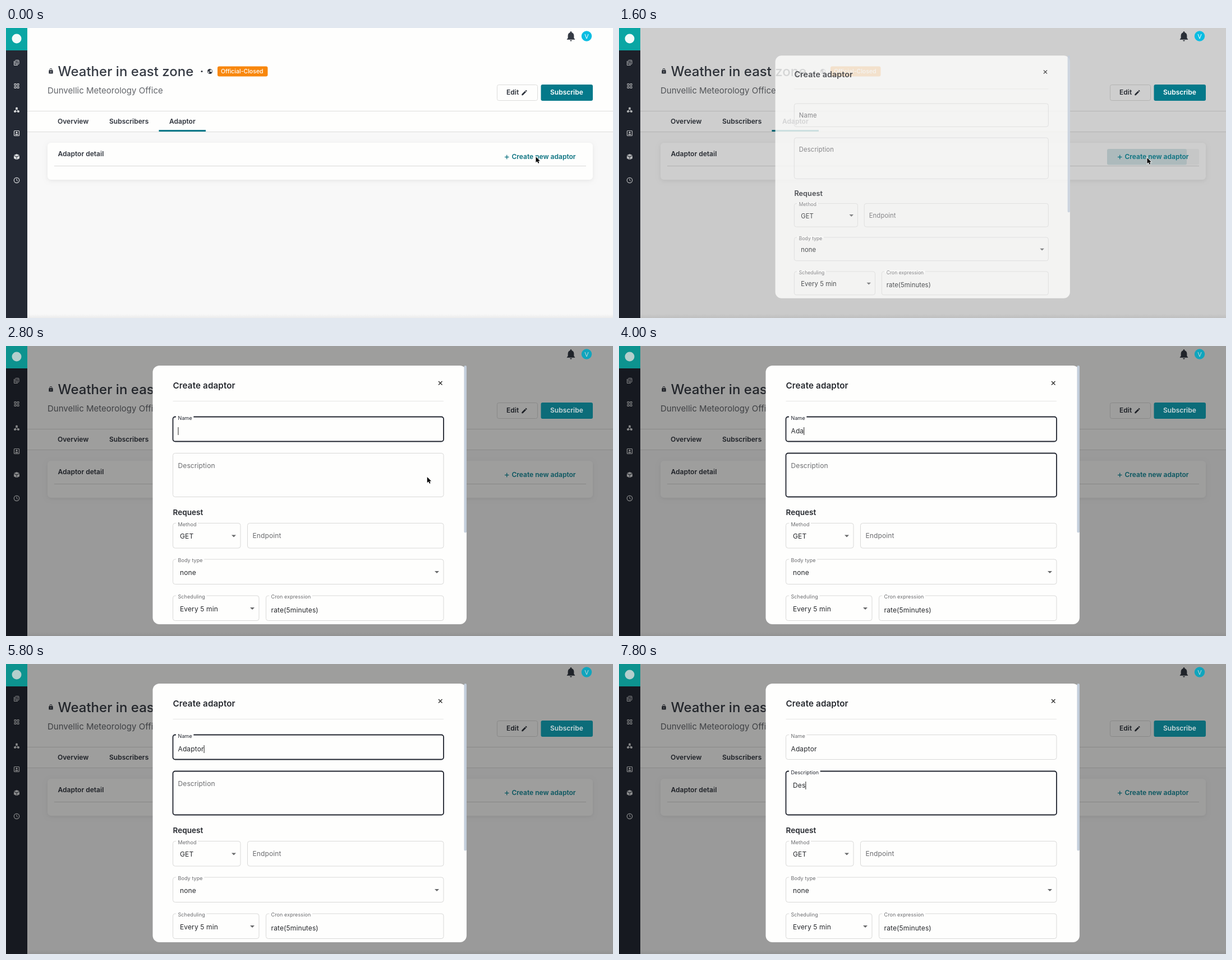
Write an HTML page with a canvas that moves like this. It is 1082 px wide and 518 px high and loops after 8000 ms.

```html
<!DOCTYPE html>
<html lang="en">
<head>
<meta charset="utf-8">
<title>Create adaptor</title>
<style>
  html, body { margin: 0; width: 100%; height: 100%; overflow: hidden; background: #fefefd; }
  canvas { display: block; width: 1082px; height: 518px; }
</style>
</head>
<body>
<canvas id="stage" width="1082" height="518"></canvas>
<script>
const W = 1082, H = 518, LOOP = 8000, STEP = 200;
const ctx = document.getElementById('stage').getContext('2d');
const INK = '#2f343d', TEAL = '#04798a', PAPER = '#fefefd', DARK = '#20242e', GREY = '#6b6c6f', EDGE = '#d9d9d8';

const ICONS = {
  bell: 'M12 22c1.1 0 2-.9 2-2h-4c0 1.1.89 2 2 2zm6-6v-5c0-3.07-1.64-5.64-4.5-6.32V4c0-.83-.67-1.5-1.5-1.5s-1.5.67-1.5 1.5v.68C7.63 5.36 6 7.92 6 11v5l-2 2v1h16v-1z',
  pencil: 'M3 17.25V21h3.75L17.81 9.94l-3.75-3.75zM20.71 7.04a1 1 0 0 0 0-1.41l-2.34-2.34a1 1 0 0 0-1.41 0l-1.83 1.83 3.75 3.75z',
  lock: 'M18 8h-1V6A5 5 0 0 0 7 6v2H6a2 2 0 0 0-2 2v10a2 2 0 0 0 2 2h12a2 2 0 0 0 2-2V10a2 2 0 0 0-2-2zM9 8V6a3 3 0 0 1 6 0v2zM10 15a2 2 0 1 0 4 0a2 2 0 1 0-4 0z',
  globe: 'M2 12a10 10 0 1 0 20 0a10 10 0 1 0-20 0zM4 10l5 5v4.5C6 19 3.500 15 4 10zM10 5h5v3l-4 2v3h5l3 3c2-3 2-8-2-10.500L15 4z',
  cursor: 'M0 0V11.500L2.700 9L4.600 13L6.500 12.100L4.700 8.300H8.200Z'
};
for (const k in ICONS) ICONS[k] = new Path2D(ICONS[k]);

const clamp = v => Math.max(0, Math.min(1, v));
const mix = (a, b, p) => a + (b - a) * clamp(p);

function rect(x, y, w, h, fill, r = 0) {
  ctx.fillStyle = fill;
  ctx.beginPath();
  ctx.roundRect(x, y, w, h, r);
  ctx.fill();
}

function frame(x, y, w, h, color, lw = 1, r = 4) {
  ctx.strokeStyle = color;
  ctx.lineWidth = lw;
  ctx.beginPath();
  ctx.roundRect(x, y, w, h, r);
  ctx.stroke();
}

function disc(x, y, r, fill) {
  ctx.fillStyle = fill;
  ctx.beginPath();
  ctx.arc(x, y, r, 0, 7);
  ctx.fill();
}

function line(color, lw, ...p) {
  ctx.strokeStyle = color;
  ctx.lineWidth = lw;
  ctx.beginPath();
  for (let i = 0; i < p.length; i += 2) ctx.lineTo(p[i], p[i + 1]);
  ctx.stroke();
}

// y is the middle of the capitals
function text(s, x, y, size = 12.02, color = INK, weight = 400, spacing = 0) {
  ctx.font = `${weight} ${size}px Inter, sans-serif`;
  ctx.letterSpacing = spacing * size + 'px';
  ctx.fillStyle = color;
  ctx.fillText(s, x, y + size * 0.36);
  return ctx.measureText(s).width;
}

function icon(name, cx, cy, size, color) {
  ctx.save();
  ctx.translate(cx - size / 2, cy - size / 2);
  ctx.scale(size / 24, size / 24);
  ctx.fillStyle = color;
  ctx.fill(ICONS[name], 'evenodd');
  ctx.restore();
}

function sidebar() {
  const c = '#dcdee0';
  rect(0, 0, 38, H, '#242934');
  // notes
  frame(16.5, 57.500, 6.5, 7, c, 1, 1);
  line(c, 1, 14.500, 59, 14.500, 66.500, 21, 66.500);
  line(c, 1, 18, 60, 22, 60);
  line(c, 1, 18, 62.500, 21, 62.500);
  // grid
  for (const x of [15, 20]) for (const y of [99.500, 104.500]) frame(x, y, 3, 3, c, 1.1, 0.5);
  // cluster
  line(c, 1, 19, 144, 16, 149, 22, 149, 19, 144);
  disc(19, 143.500, 2, c);
  disc(16, 149, 2, c);
  disc(22, 149, 2, c);
  // contact card
  frame(14.500, 183.500, 9, 9, c, 1.2, 1);
  disc(19, 186.700, 1.6, c);
  rect(16.300, 189.300, 5.400, 2, c, 1);
  // box
  ctx.fillStyle = c;
  ctx.fill(new Path2D('M19 225l5 2.300-5 2.300-5-2.300zM14 228.300l4.600 2.200v4.700L14 233zM24 228.300l-4.600 2.200v4.700L24 233z'));
  // clock
  ctx.beginPath();
  ctx.arc(19, 272, 4.700, 0, 7);
  ctx.lineWidth = 1.2;
  ctx.stroke();
  line(c, 1, 19, 269, 19, 272.300, 21, 273.500);
}

function page(hover, ripple) {
  rect(0, 0, W, H, PAPER);
  rect(38, 185, W - 38, H - 185, '#f8f8f8');
  const fade = ctx.createLinearGradient(0, 511, 0, H);
  fade.addColorStop(0, 'rgba(0,0,0,0)');
  fade.addColorStop(1, 'rgba(0,0,0,.05)');
  rect(38, 511, W - 38, 7, fade);
  line('#dededd', 1, 38, 148.500, W, 148.500);
  line('#dcdcdb', 1, 38, 185.500, W, 185.500);
  sidebar();

  icon('bell', 1007, 14.500, 21.500, '#343a44');
  icon('lock', 80, 77, 11, INK);
  text('Weather in east zone', 92.500, 77.500, 24.04, '#363b44', 500);
  disc(349, 77.500, 1.6, INK);
  icon('globe', 363.500, 77.500, 11, INK);
  rect(377, 68.500, 89.500, 18, '#f8870d', 3);
  text('Official-Closed', 383, 77.500, 10.52, '#fff', 500);
  text('Dunvellic Meteorology Office', 74, 112, 15.03, '#63666b');

  frame(875.500, 101.500, 72, 28, '#dcdcdb', 1, 3);
  text('Edit', 892, 115, 12.02, INK, 600);
  icon('pencil', 924, 115.500, 12.5, INK);

  text('Overview', 92, 167, 12.02, INK, 600);
  text('Subscribers', 184, 167, 12.02, INK, 600);
  text('Adaptor', 291, 167, 12.02, INK, 600);
  rect(272.500, 182, 83.500, 3, TEAL);

  ctx.save();
  ctx.shadowColor = 'rgba(0,0,0,.07)';
  ctx.shadowBlur = 7;
  ctx.shadowOffsetY = 2;
  rect(74, 205, 972, 66, PAPER, 6);
  ctx.restore();
  text('Adaptor detail', 92.500, 225, 12.02, INK, 600);
  line('#d9d9d8', 1, 86, 246.500, 1034, 246.500);
  if (hover) rect(870, 216, 164, 28.500, hover, 3);
  if (ripple) rect(870, 216, ripple, 28.500, 'rgba(4,121,138,.13)', 3);
}

// Saturated parts keep most of their colour behind the backdrop
function accents(dim) {
  const on = dim > 0.3;
  const white = on ? '#c9d6d8' : '#fff';
  rect(0, 0, 38, 40, on ? '#0d938f' : '#0aa6a4');
  disc(19, 19, 8.500, on ? '#b5cfcd' : '#f2fbfa');
  disc(1035, 14.500, 9.2, on ? '#10a5bd' : '#0abde2');
  text('V', 1031.300, 14.800, 11, white);
  rect(953.500, 101, 92.500, 29, on ? '#0c6c79' : TEAL, 3);
  text('Subscribe', 970, 115, 12.02, white, 600);
  const teal = on ? '#0a5660' : '#0a7280';
  line(teal, 1.3, 889, 230.500, 896.500, 230.500);
  line(teal, 1.3, 892.750, 226.700, 892.750, 234.300);
  text('Create new adaptor', 901.500, 229.500, 12.02, teal, 600);
}

// Outlined field; float runs 0..1 as the label rises into the border
function field(x, y, w, h, label, { float = 1, strong = false, focus = false, rest = 22 } = {}) {
  frame(x, y, w, h, strong ? DARK : EDGE, strong ? 1.8 : 1, 4);
  const size = mix(12.02, 9.02, float);
  ctx.font = `400 ${size}px Inter, sans-serif`;
  ctx.letterSpacing = size * 0.00938 + 'px';
  const labelW = ctx.measureText(label).width;
  if (float) rect(x + 5.500, y - 1.500, labelW + 6, 3, PAPER);
  text(label, x + 9, y + mix(rest, 2, float), size, focus ? DARK : GREY, 400, 0.00938);
}

function select(x, y, w, label, value) {
  field(x, y, w, 44.500, label);
  text(value, x + 12.500, y + 23.500, 12.02, '#26282c', 400, 0.00938);
  const ax = x + w - 12, ay = y + 21;
  ctx.fillStyle = '#67686a';
  ctx.fill(new Path2D(`M${ax - 4} ${ay}h8l-4 4z`));
}

function entry(s, x, y, caret) {
  const w = text(s, x, y, 12.02, '#26282c', 400, 0.00938);
  if (caret) rect(x + w, y - 7, 1, 14, '#222');
}

function modal(s) {
  ctx.save();
  ctx.globalAlpha = s.alpha;
  ctx.translate(541, 266);
  ctx.scale(s.scale, s.scale);
  ctx.translate(-541, -266);
  rect(261.500, 35, 559.500, 462, PAPER, 12);
  rect(816.500, 35, 4.500, 298.500, '#c3cedb', 2);
  text('Create adaptor', 297.500, 71, 15.2, '#25282e', 600, 0.0075);
  line('#333', 1.4, 771, 63, 777.500, 69.500);
  line('#333', 1.4, 777.500, 63, 771, 69.500);
  line('#e6e6e5', 1, 297.500, 98.500, 780, 98.500);

  field(297.500, 126.500, 482.500, 44, 'Name', { float: s.nameFloat, strong: s.nameFocus, focus: s.nameFocus });
  entry(s.name, 306.500, 152, s.nameFocus && s.caret);
  field(297.500, 191.500, 482.500, 78, 'Description',
    { float: s.descFloat, strong: s.descHover || s.descFocus, focus: s.descFocus });
  entry(s.desc, 310, 217, s.descFocus && s.caret);

  text('Request', 297.500, 297, 13.6, '#25282e', 600);
  select(297.500, 316.500, 120.500, 'Method', 'GET');
  field(430.500, 316.500, 349.500, 44.500, 'Endpoint', { float: 0, rest: 22.500 });
  select(297.500, 381, 482.500, 'Body type', 'none');
  select(297.500, 446, 153.500, 'Scheduling', 'Every 5 min');
  field(463.500, 446, 316.500, 44.500, 'Cron expression');
  text('rate(5minutes)', 472.500, 471.500, 12.02, '#26282c', 400, 0.00938);
  ctx.restore();
}

function pointer(x, y) {
  ctx.save();
  ctx.translate(x, y);
  ctx.scale(0.9, 0.9);
  ctx.lineWidth = 1.6;
  ctx.strokeStyle = '#fff';
  ctx.stroke(ICONS.cursor);
  ctx.fillStyle = '#000';
  ctx.fill(ICONS.cursor);
  ctx.restore();
}

// Letters arrive one per step; the caret blinks from the latest key
const typed = (word, t, start) => word.slice(0, Math.max(0, Math.floor((t - start) / STEP) + 1));

function state(t) {
  const nameFocus = t >= 1800 && t < 6600, descFocus = t >= 6600;
  const key = descFocus
    ? (t >= 7400 ? t : 6600)
    : (t >= 3600 ? Math.min(t, 4800) : 1800);
  return {
    nameFocus, descFocus,
    alpha: t < 1800 ? 0.8 : 1,
    scale: t < 1800 ? 0.9388 : 1,
    nameFloat: t < 1800 ? 0 : t < 2000 ? 0.7 : 1,
    descFloat: t < 6600 ? 0 : t < 6800 ? 0.7 : 1,
    descHover: t >= 3200,
    name: typed('Adaptor', t, 3600),
    desc: typed('Des', t, 7400),
    caret: (t - key) % 1000 < 500
  };
}

function draw(now) {
  const t = Math.floor((now % LOOP) / STEP) * STEP;
  const open = t >= 1600;
  const dim = !open ? 0 : t < 1800 ? 0.19 : 0.38;
  const ripple = !open || t >= 2400 ? 0 : t < 1800 ? 142 : 163;
  const hover = t === 1400 ? '#dcdcdc' : t === 1600 ? '#f4f5f5' : null;

  page(hover, ripple);
  if (open) rect(0, 0, W, H, `rgba(0,0,0,${dim})`);
  accents(dim);
  if (open) modal(state(t));
  if (t < 3200) {
    const move = (t - 2400) / 800;
    pointer(mix(mix(944.500, 941.500, t / 1200), 560, move), mix(mix(230, 232, t / 1200), 236, move));
  }
}

function tick() {
  draw(performance.now());
  requestAnimationFrame(tick);
}
tick();
</script>
</body>
</html>
```
